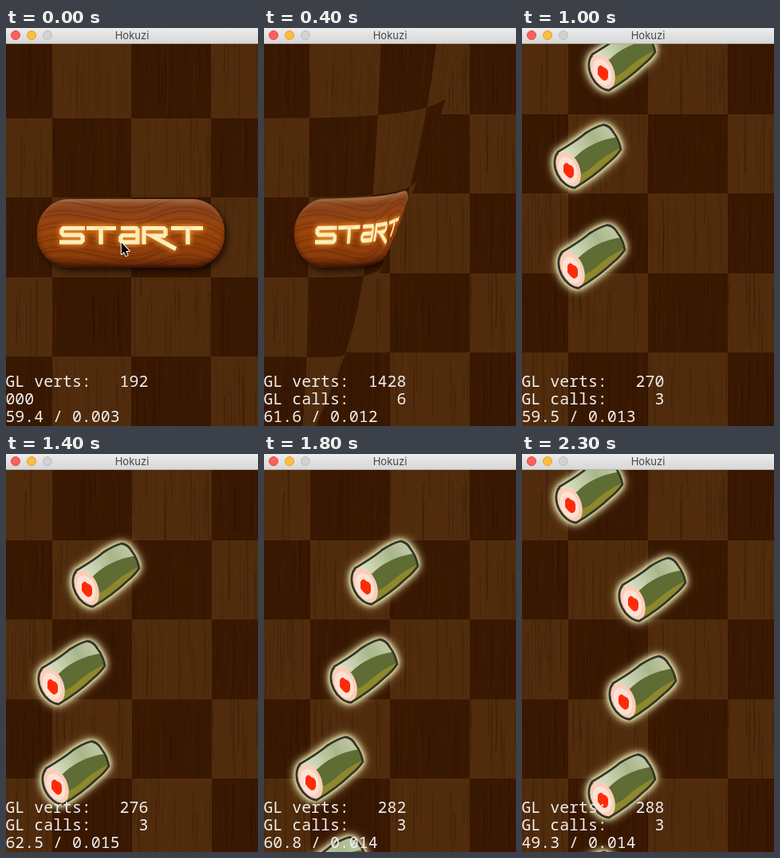
Write an HTML page with a canvas that moves like this. It is 316 px wide and 498 px high and loops after 2.4 s.

```html
<!DOCTYPE html>
<html lang="en">
<head>
<meta charset="utf-8">
<title>Hokuzi</title>
<style>
html, body { margin: 0; width: 316px; height: 498px; overflow: hidden; background: #361700; }
canvas { display: block; }
</style>
</head>
<body>
<canvas id="stage" width="316" height="498"></canvas>
<script>
const W = 316, H = 498, BAR = 20, LOOP = 2400, STEP = 100;
const ctx = document.getElementById('stage').getContext('2d');

function layer(draw) {
  const c = document.createElement('canvas');
  c.width = W;
  c.height = H;
  draw(c.getContext('2d'));
  return c;
}

function seeded(s) {
  return () => (s = (s * 16807) % 2147483647) / 2147483647;
}

function line(g, pts) {
  g.beginPath();
  pts.forEach(([x, y], i) => i ? g.lineTo(x, y) : g.moveTo(x, y));
  g.stroke();
}

// ---- chequered wood ----
function board(g, left, top, parity) {
  const rnd = seeded(77 + parity), size = 99.5;
  for (let r = 0; r < 6; r++) {
    for (let c = 0; c < 4; c++) {
      const x = Math.round(left + (c - 1) * 99.6), y = Math.round(top + (r - 1) * size);
      const dark = (r + c + parity) % 2;
      g.save();
      g.beginPath();
      g.rect(x, y, 101, 101);
      g.clip();
      g.fillStyle = dark ? '#391802' : '#502c0d';
      g.fillRect(x, y, 101, 101);
      for (let i = 0; i < 26; i++) {
        const sx = x + rnd() * 100, sy = y + rnd() * 70 - 20, len = 30 + rnd() * 80;
        g.strokeStyle = rnd() < 0.6 ? 'rgba(25,6,0,.18)' : 'rgba(120,65,25,.1)';
        g.lineWidth = 0.6 + rnd() * 1.2;
        g.beginPath();
        g.moveTo(sx, sy);
        g.quadraticCurveTo(sx + rnd() * 6 - 3, sy + len / 2, sx, sy + len);
        g.stroke();
      }
      g.restore();
    }
  }
}

// ---- start button ----
function button(g) {
  const shape = () => { g.beginPath(); g.roundRect(39, 214, 235, 86, 41); };
  g.save();
  g.shadowColor = 'rgba(0,0,0,.7)';
  g.shadowBlur = 8;
  g.shadowOffsetX = 3;
  g.shadowOffsetY = 4;
  g.fillStyle = '#7a340c';
  shape();
  g.fill();
  g.restore();

  g.save();
  shape();
  g.clip();
  const wood = g.createLinearGradient(0, 214, 0, 300);
  wood.addColorStop(0, '#9a6238');
  wood.addColorStop(0.12, '#8a431a');
  wood.addColorStop(0.5, '#99440a');
  wood.addColorStop(0.85, '#873a0a');
  wood.addColorStop(1, '#4a1d06');
  g.fillStyle = wood;
  g.fillRect(39, 214, 235, 86);
  for (let i = 0; i < 22; i++) {
    const y = 208 + i * 5;
    g.strokeStyle = i % 3 ? 'rgba(70,18,0,.2)' : 'rgba(205,92,25,.2)';
    g.lineWidth = 1 + i % 3 * 0.6;
    g.beginPath();
    g.moveTo(36, y + 8);
    g.bezierCurveTo(90, y - 16, 130, y + 26, 180, y + 8);
    g.bezierCurveTo(215, y - 10, 245, y - 8, 276, y + 14);
    g.stroke();
  }
  g.lineWidth = 4;
  g.filter = 'blur(2px)';
  const bevel = g.createLinearGradient(0, 214, 0, 300);
  bevel.addColorStop(0, 'rgba(190,135,95,.6)');
  bevel.addColorStop(0.5, 'rgba(80,30,6,.4)');
  bevel.addColorStop(1, 'rgba(40,12,2,.8)');
  g.strokeStyle = bevel;
  shape();
  g.stroke();
  g.restore();

  const strokes = [
    [[99, 249.5], [72, 249.5], [70, 252], [70, 256], [72, 258], [94, 258], [96, 260], [96, 265], [94, 267], [67, 267]],
    [[101, 249.5], [138, 249.5]], [[119, 249.5], [119, 269.5]],
    [[144, 249.5], [163, 249.5], [165, 251.5], [165, 267], [146, 267], [144, 265], [144, 260.5], [146, 258.5], [165, 258.5]],
    [[173, 269.5], [173, 249.5], [198, 249.5], [200, 251.5], [200, 257], [198, 259], [183, 259], [213, 275.5]],
    [[207, 249.5], [247, 249.5]], [[228, 249.5], [228, 269.5]]
  ];
  g.save();
  g.translate(0, 1);
  g.lineWidth = 5;
  g.shadowColor = '#e88a28';
  g.shadowBlur = 7;
  g.strokeStyle = '#fdeebb';
  for (let pass = 0; pass < 2; pass++) strokes.forEach(s => line(g, s));
  g.restore();
}

// ---- roll, drawn around its centre ----
function roll(g, x, y) {
  const body = new Path2D(
    'M-38-5Q-13-20 -4-28Q8-36 19-39Q27-38 32-29Q39-20 41-8Q35 1 26 8Q7 26 -17 40' +
    'C-34 39 -50 12 -38-5Z');
  g.save();
  g.translate(x, y);
  g.shadowColor = '#f6f3b4';
  g.fillStyle = '#5f6c33';
  for (const blur of [14, 11, 8, 5]) {
    g.shadowBlur = blur;
    g.fill(body);
  }
  g.shadowBlur = 0;
  g.save();
  g.clip(body);
  const shine = g.createLinearGradient(-30, 0, 32, -36);
  shine.addColorStop(0, '#dbe2c8');
  shine.addColorStop(0.6, '#a9b68a');
  shine.addColorStop(1, '#c3cba9');
  g.fillStyle = shine;
  g.fill(new Path2D('M-40-4Q-10-24 19-42L39-24Q4-19 -17 2Z'));
  g.fillStyle = '#8d882b';
  g.fill(new Path2D('M44-12Q20 0 6 13Q-3 21 -12 24L-18 43L44 10Z'));
  g.restore();

  g.save();
  g.translate(-25.5, 17.5);
  g.rotate(-0.36);
  const oval = (rx, ry, fill) => {
    g.beginPath();
    g.ellipse(0, 0, rx, ry, 0, 0, 7);
    g.fillStyle = fill;
    g.fill();
  };
  oval(15, 23.5, '#f9cdb8');
  oval(11, 17, '#fde2d3');
  g.restore();
  g.fillStyle = '#ff2b08';
  g.fill(new Path2D('M-31 12Q-28 6 -24 11Q-17 13 -18 20Q-17 27 -23 28Q-27 26 -31 20Z'));

  g.strokeStyle = '#34352b';
  g.lineWidth = 2.8;
  g.lineJoin = 'round';
  g.stroke(body);
  g.restore();
}

const lane = [[88, 285.5], [83, 160], [126, 38], [152, -85], [164, -208], [85, -331]];
const fallKeys = [[1000, 0], [1400, 113], [1600, 175.5], [2000, 290.5], [2300, 377]];

function fallen(t) {
  if (t <= 1000) return (t - 1000) * 0.288;
  for (let i = 1; i < fallKeys.length; i++) {
    const [t0, y0] = fallKeys[i - 1], [t1, y1] = fallKeys[i];
    if (t <= t1) return y0 + (y1 - y0) * (t - t0) / (t1 - t0);
  }
  return 377 + (t - 2300) * 0.288;
}

function rollsAt(t) {
  const d = fallen(t);
  return lane.map(([x, y]) => [x, y + d]).filter(([, y]) => y > 30 && y < 548);
}

// ---- page turn: a grid wrapped round a cone ----
const K = W / 320, PH = (H - BAR) / K, COLS = 12, ROWS = 16, EYE = 415;

function curl(px, py, u) {
  const late = Math.max(0, u - 0.25), ay = -100 - late * late * 500;
  const theta = 0.01 + Math.PI / 2 * (1 - Math.sqrt(u));
  const s = Math.sin(theta), R = Math.hypot(px, py - ay), r = R * s;
  const beta = Math.asin(px / R) / s, lift = 1 - Math.cos(beta);
  const x = beta <= Math.PI ? r * Math.sin(beta) : 0;
  const y = R + ay - r * lift * s;
  const z = Math.max(0.5, r * lift * Math.cos(theta) / 7);
  const p = EYE / (EYE - z);
  return [(160 + (x - 160) * p) * K, H - (240 + (y - 240) * p) * K];
}

function triangle(g, img, src, dst) {
  const [[x0, y0], [x1, y1], [x2, y2]] = src;
  const [[u0, v0], [u1, v1], [u2, v2]] = dst;
  if ((u1 - u0) * (v2 - v0) - (u2 - u0) * (v1 - v0) >= 0) return; // faces away
  const det = (x1 - x0) * (y2 - y0) - (x2 - x0) * (y1 - y0);
  const a = ((u1 - u0) * (y2 - y0) - (u2 - u0) * (y1 - y0)) / det;
  const c = ((u2 - u0) * (x1 - x0) - (u1 - u0) * (x2 - x0)) / det;
  const b = ((v1 - v0) * (y2 - y0) - (v2 - v0) * (y1 - y0)) / det;
  const d = ((v2 - v0) * (x1 - x0) - (v1 - v0) * (x2 - x0)) / det;
  const cx = (u0 + u1 + u2) / 3, cy = (v0 + v1 + v2) / 3;
  g.save();
  g.beginPath();
  for (const [x, y] of dst) {
    const grow = 1 + 0.9 / (Math.hypot(x - cx, y - cy) || 1);
    g.lineTo(cx + (x - cx) * grow, cy + (y - cy) * grow);
  }
  g.clip();
  g.transform(a, b, c, d, u0 - a * x0 - c * y0, v0 - b * x0 - d * y0);
  g.drawImage(img, 0, 0);
  g.restore();
}

function turnPage(g, img, u) {
  const node = (i, j) => {
    const x = i * 320 / COLS, y = j * PH / ROWS;
    return { src: [x * K, H - y * K], dst: curl(x, y, u) };
  };
  const face = (...n) => triangle(g, img, n.map(p => p.src), n.map(p => p.dst));
  for (let i = 0; i < COLS; i++) {
    for (let j = 0; j < ROWS; j++) {
      const a = node(i, j), b = node(i + 1, j), c = node(i + 1, j + 1), d = node(i, j + 1);
      face(a, b, d);
      face(b, c, d);
    }
  }
}

// ---- window bar, counters, pointer ----
function titleBar(g) {
  const grey = g.createLinearGradient(0, 0, 0, BAR);
  grey.addColorStop(0, '#ececec');
  grey.addColorStop(1, '#d6d6d6');
  g.fillStyle = grey;
  g.fillRect(0, 0, W, BAR);
  g.fillStyle = '#b5b0ac';
  g.fillRect(0, BAR - 1, W, 1);
  [['#fc615c', '#df4744'], ['#fdbd41', '#de9f34'], ['#d2d2d2', '#bcbcbc']].forEach(([fill, rim], i) => {
    g.beginPath();
    g.arc(12 + i * 20, 9, 5.5, 0, 7);
    g.fillStyle = fill;
    g.fill();
    g.strokeStyle = rim;
    g.lineWidth = 1;
    g.stroke();
  });
  g.fillStyle = '#464646';
  g.font = '13px Inter, "Open Sans", sans-serif';
  g.textAlign = 'center';
  g.fillText('Hokuzi', 158, 14);
  g.textAlign = 'left';
}

const rates = ('59.4 / 0.003,60.1 / 0.004,58.9 / 0.010,60.3 / 0.011,61.6 / 0.012,60.7 / 0.012,' +
  '58.4 / 0.013,60.2 / 0.014,59.8 / 0.012,60.4 / 0.014,59.5 / 0.013,60.6 / 0.012,' +
  '59.1 / 0.014,61.2 / 0.013,62.5 / 0.015,60.0 / 0.013,57.7 / 0.011,59.6 / 0.013,' +
  '60.8 / 0.014,60.5 / 0.012,61.7 / 0.000,59.9 / 0.013,58.2 / 0.014,49.3 / 0.014').split(',');

function stats(g, t) {
  const turning = t >= 200 && t < 600;
  const verts = t < 200 ? 192 : turning ? 1428 : 258 + 6 * rollsAt(t - 50).length;
  const field = (name, n) => name + String(n).padStart(6);
  g.font = '19.9px "Noto Sans Mono", "DejaVu Sans Mono", monospace';
  g.fillStyle = '#f1efec';
  g.fillText(field('GL verts:', verts), -0.6, 449);
  g.fillText(t < 200 ? '000' : field('GL calls:', turning ? 6 : 3), -0.6, 471);
  g.fillText(rates[t / STEP], -0.6, 493);
}

function pointer(g) {
  const arrow = new Path2D('M144.8 268.5V283L148 280L150.4 285.2L152.6 284.2L150.3 279H154.6Z');
  g.lineJoin = 'round';
  g.strokeStyle = '#fff';
  g.lineWidth = 2;
  g.stroke(arrow);
  g.fillStyle = '#000';
  g.fill(arrow);
}

const floor = layer(g => board(g, 58.4, 107.6, 0));
const page = layer(g => { board(g, 57.6, 112.8, 1); button(g); });

function paint(t) {
  if (t <= 100) {
    ctx.drawImage(page, 0, 0);
  } else {
    ctx.drawImage(floor, 0, 0);
    rollsAt(t).forEach(([x, y]) => roll(ctx, x, y));
    if (t < 600) turnPage(ctx, page, (t - 100) / 500);
  }
  stats(ctx, t);
  titleBar(ctx);
  if (t < 100) pointer(ctx);
}

const start = performance.now();
let shown = -1;
function tick() {
  const t = Math.floor((performance.now() - start) % LOOP / STEP) * STEP;
  if (t !== shown) paint(shown = t);
  requestAnimationFrame(tick);
}
tick();
</script>
</body>
</html>
```
